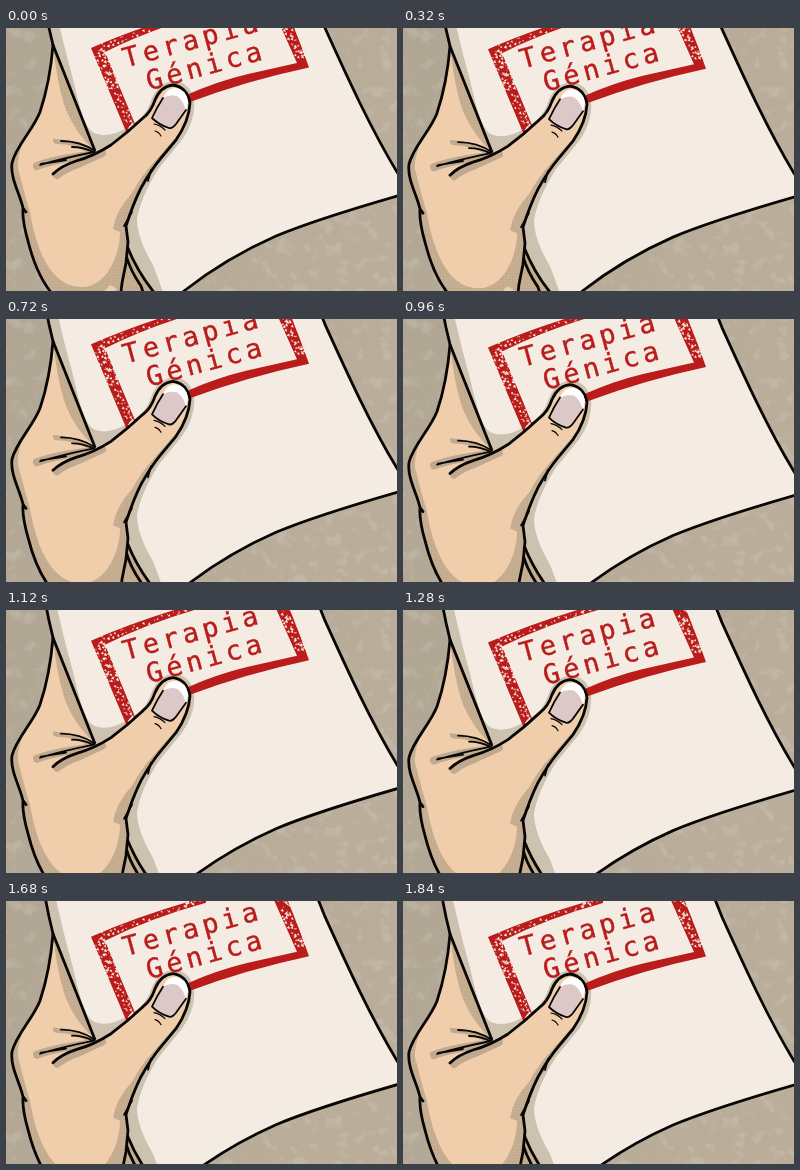
Write an HTML page that moves like this. It is 391 px wide and 263 px high and loops after 1920 ms.

```html
<!DOCTYPE html>
<html lang="es">
<head>
<meta charset="utf-8">
<style>
  html, body { margin: 0; width: 100%; height: 100%; overflow: hidden; background: #b5ab98; }
  svg { display: block; width: 391px; height: 263px; }
  .ink { fill: none; stroke: #080706; stroke-width: 2.8; stroke-linecap: round; stroke-linejoin: round; }
  .thin { stroke-width: 1.8; }
  .fine { stroke-width: 1.2; }
  .skin { fill: #f0ceac; }
  .red { fill: #ba1b1b; }
  .lobe { fill: none; stroke: #c0a98e; stroke-width: 8; stroke-linecap: round; }
  text { font: 27px "DejaVu Sans Mono", monospace; letter-spacing: 4.2px; fill: #ba1b1b; stroke: #ba1b1b; stroke-width: .4; }
</style>
</head>
<body>
<svg viewBox="0 0 391 263">
  <defs>
    <linearGradient id="wall" x2="1" y2=".3">
      <stop offset="0" stop-color="#b0a693"/>
      <stop offset="1" stop-color="#baae9b"/>
    </linearGradient>
    <filter id="grain" x="0" y="0" width="100%" height="100%">
      <feTurbulence type="fractalNoise" baseFrequency=".07" numOctaves="5" seed="8"/>
      <feColorMatrix values="0 0 0 0 .78  0 0 0 0 .74  0 0 0 0 .66  5 0 0 0 -2.75"/>
    </filter>
    <pattern id="shade" width="3" height="3" patternUnits="userSpaceOnUse">
      <rect width="3" height="3" fill="#c9b093"/>
      <circle cx="1.5" cy="1.5" r="1" fill="#bda78c"/>
    </pattern>
    <clipPath id="handClip"><use href="#handShape"/></clipPath>
    <clipPath id="paperClip"><use href="#paperShape"/></clipPath>
  </defs>

  <rect width="391" height="263" fill="url(#wall)"/>
  <rect width="391" height="263" filter="url(#grain)" opacity=".2"/>

  <g id="scene">
    <path class="skin" d="M47 17C45 42 40 66 34 84C27 102 10 118 6 135C4 150 14 166 17 180L100 190L90 122Z"/>
    <path fill="url(#shade)" d="M47 18C50 42 53 62 60 82Q70 106 90 124Z"/>
    <path fill="url(#shade)" d="M119 212L147 263L155 285L114 285Z"/>

    <path id="paperShape" fill="#f4ece2" d="M37 -30L43 0L47 17L89 123L121 220L147 263L160 285L160 279L178 263Q220 230 270 208Q308 192 391 168L420 160L420 190Q397 158 391 144C365 101 343 53 319 0L307 -30Z"/>
    <g clip-path="url(#paperClip)">
      <path fill="#cdc2b0" d="M30 -30H47L54 0Q60 26 66 47C74 79 78 103 91 106Q104 110 122 99Q140 89 145 73Q152 54 168 53Q184 54 188 72Q190 92 176 112L153 140Q135 168 131 191Q131 210 147 237L165 285H90Z"/>
      <g id="stamp">
        <path class="red" d="M85 20Q135 -2 200 -20L200 -14Q145 1 99 24L129 96L122 108Z"/>
        <path class="red" d="M262 -30L276 -30Q292 8 303 39.5Q240 53 184 74L120 111L123 99Q180 61 240 46.5L291 35Z"/>
        <g id="wear" fill="#f4e4da"></g>
        <text transform="translate(119.5 39.5) rotate(-15.2)">Terapia</text>
        <text transform="translate(143 62.5) rotate(-15.2)">Génica</text>
      </g>
    </g>
    <path class="ink" d="M37 -30L43 0L47 17L89 123M307 -30L319 0C343 53 365 101 391 144L405 166"/>
    <path class="ink" d="M405 164L391 168Q308 192 270 208Q220 230 178 263L158 281"/>
    <path class="ink" d="M121 218Q131 243 147 263L162 282M120 227Q124 242 135 258L143 282"/>

    <path id="handShape" class="skin" d="M6 135C4 150 14 166 17 180Q16 192 22 213Q30 245 44 263L56 285H113L116 255L120 235L122 214L120 198Q128 176 135 160Q145 142 155 130Q173 110 181 92Q186 76 182 65Q175 56 166 57Q154 60 149 72Q145 86 128 99Q110 117 89 123L60 112L20 108Z"/>
    <g clip-path="url(#handClip)">
      <path fill="url(#shade)" d="M0 120L20 108Q11 126 12 140Q18 164 24 184C29 214 42 259 76 259C100 259 114 228 114 204L107 201Q110 182 126 165Q135 148 148 134L178 100L186 82L194 100L130 200V290H0Z"/>
      <path class="lobe" d="M51 112Q68 112 86 122M31 138Q50 131 84 127M51 147Q58 141 72 136L96 125"/>
      <path class="skin" d="M98 264L104 257L110 260L106 285H96Z"/>
    </g>
    <path class="ink" d="M47 17C45 42 40 66 34 84C27 102 10 118 6 135C4 150 14 166 17 180L20 184M17 180Q16 192 22 213Q30 245 44 263L56 282"/>
    <path class="ink" d="M47 146Q55 138 70 133Q88 128 105 117Q121 105 137 90Q145 84 149 72Q155 58 167 57Q181 59 184 75Q183 93 170 112L155 130Q145 142 135 160Q127 176 120 198L122 214L120 235L116 255L113 282"/>
    <path class="ink thin" d="M55 113Q74 113 89 123M66 119Q77 119 87 124M34 137Q58 130 88 124M35 136L60 132M118 198L126 184M145 142L142 153"/>
    <path fill="#ddc8c8" d="M146 90Q151 79 157 71Q164 65 174 66L181 73Q180 83 167 99Q164 102 159 98Q153 95 146 90Z"/>
    <path fill="#fff" d="M157 70Q161 60 169 60Q180 61 182 73L180 83Q178 73 171 68Q164 66 157 70Z"/>
    <path class="ink thin" d="M157 70Q151 79 146 90Q153 97 163 100Q166 101 170 96L180 82"/>
    <path class="ink fine" d="M148 96Q154 97 159 102M149 103Q153 104 155 108"/>
  </g>
</svg>
<script>
  const STEP = 80, STEPS = 24, TRAVEL = 16;
  const scene = document.getElementById('scene');
  const wear = document.getElementById('wear');

  let seed = 17;
  const random = () => (seed = seed * 16807 % 2147483647) / 2147483647;

  // Worn ink: flecks scattered across a bar from a to b.
  function scatter([ax, ay], [bx, by], width, count) {
    let d = '';
    const length = Math.hypot(bx - ax, by - ay);
    for (let i = 0; i < count; i++) {
      const along = random(), across = (random() - .5) * width;
      const x = ax + (bx - ax) * along - (by - ay) / length * across;
      const y = ay + (by - ay) * along + (bx - ax) / length * across;
      const size = .5 + random() * 2;
      d += `M${x.toFixed(1)} ${y.toFixed(1)}l${size.toFixed(1)} ${(-size).toFixed(1)}l.8 ${(size * 1.5).toFixed(1)}z`;
    }
    const path = document.createElementNS('http://www.w3.org/2000/svg', 'path');
    path.setAttribute('d', d);
    wear.append(path);
  }
  scatter([91, 23], [107, 62], 12, 80);
  scatter([107, 62], [125, 99], 8, 35);
  scatter([94, 19], [195, -17], 5, 40);
  scatter([270, -25], [296, 30], 13, 75);

  function draw(now) {
    const step = Math.floor(now / STEP) % STEPS;
    const y = TRAVEL * (1 - Math.cos(Math.PI * step / (STEPS - 1))) / 2;
    scene.setAttribute('transform', `translate(0 ${y.toFixed(2)})`);
  }

  const start = performance.now();
  function tick() {
    draw(performance.now() - start);
    requestAnimationFrame(tick);
  }
  tick();
</script>
</body>
</html>
```
